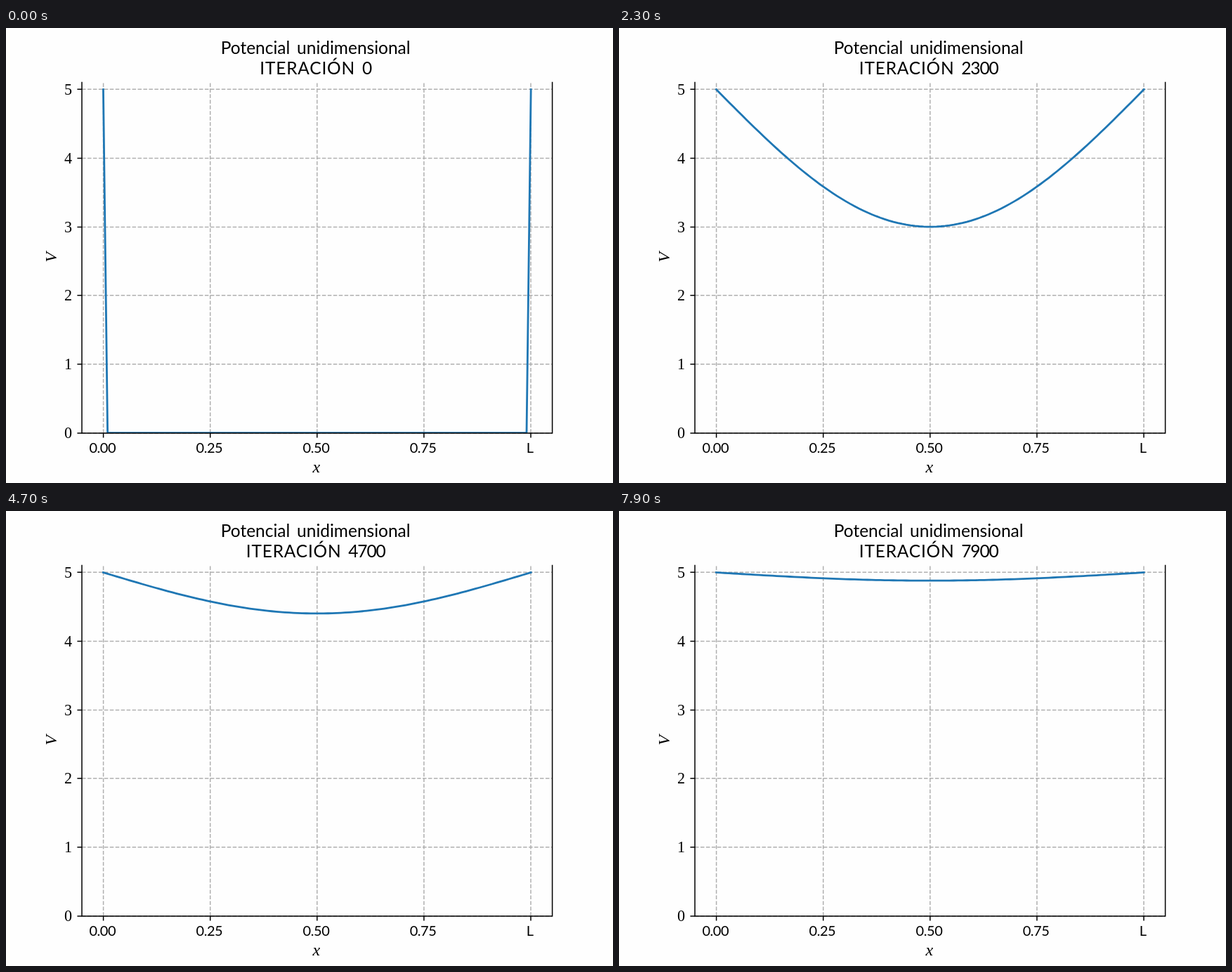
These frames come from a looping animation (864 px wide and 648 px high, 8 s). An HTML page:

```html
<!DOCTYPE html>
<html lang="es">
<head>
<meta charset="utf-8">
<title>Potencial unidimensional</title>
<style>
  html, body { margin: 0; width: 100%; height: 100%; overflow: hidden; background: #fefefe; }
  svg { display: block; width: 864px; height: 648px; }
  text { text-anchor: middle; fill: #000; }
  .title { font: 27.2px Lato, "Open Sans", sans-serif; word-spacing: 4px; }
  .word { letter-spacing: .9px; }
  .count { letter-spacing: -1.3px; }
  .xtick { font: 22.2px Lato, "Open Sans", sans-serif; letter-spacing: -.5px; }
  .ytick { font: 24.5px "Liberation Serif", "Noto Serif", serif; text-anchor: end; }
  .axis { font: italic 26.6px "Liberation Serif", "Noto Serif", serif; }
  .grid { stroke: #b0b0b0; stroke-width: 1.667; stroke-dasharray: 6.167 2.667; fill: none; }
  .frame { stroke: #000; stroke-width: 1.667; fill: none; }
  .curve { stroke: #1f77b4; stroke-width: 3.125; stroke-linecap: square; stroke-linejoin: round; fill: none; }
</style>
</head>
<body>
<svg viewBox="0 0 960 720">
  <clipPath id="area"><rect x="120" y="86" width="744" height="555"/></clipPath>
  <text class="title" x="489.6" y="40.8">Potencial unidimensional</text>
  <text class="title" x="489.6" y="73.7"><tspan class="word">ITERACIÓN</tspan> <tspan class="count" id="count">0</tspan></text>
  <path class="grid" id="grid"/>
  <path class="curve" id="curve" clip-path="url(#area)"/>
  <path class="frame" id="ticks"/>
  <path class="frame" stroke-linecap="square" d="M120 86V641M864 86V641M120 641H864"/>
  <g id="labels"></g>
  <text class="axis" x="491" y="703.3">x</text>
  <text class="axis" transform="translate(79.6 362.8) rotate(-90)">V</text>
</svg>
<script>
  const POINTS = 100, EDGE = 5, STEPS = 80, STEP_MS = 100, SWEEPS = 100;
  const $ = id => document.getElementById(id);
  const px = x => 153.82 + 676.36 * x;
  const py = v => 640.8 - 108.706 * v;

  function drawAxes() {
    let grid = "", ticks = "", labels = "";
    ["0.00", "0.25", "0.50", "0.75", "L"].forEach((name, i) => {
      const x = Math.round(px(i / 4));
      grid += `M${x} 641V86`;
      ticks += `M${x} 641v7.3`;
      labels += `<text class="xtick" x="${x - 1.5}" y="672.2">${name}</text>`;
    });
    for (let v = 0; v <= EDGE; v++) {
      const y = Math.round(py(v));
      grid += `M120 ${y}H864`;
      ticks += `M120 ${y}h-7.3`;
      labels += `<text class="ytick" x="104.4" y="${y + 8}">${v}</text>`;
    }
    $("grid").setAttribute("d", grid);
    $("ticks").setAttribute("d", ticks);
    $("labels").innerHTML = labels;
  }

  // Each interior point becomes the mean of its neighbours.
  const relax = v => v.map((value, i) =>
    i === 0 || i === POINTS - 1 ? value : (v[i - 1] + v[i + 1]) / 2);

  const toPath = v => "M" + Array.from(v, (value, i) =>
    px(i / (POINTS - 1)).toFixed(2) + " " + py(value).toFixed(2)).join("L");

  function solve() {
    const paths = [];
    let v = new Float64Array(POINTS);
    v[0] = v[POINTS - 1] = EDGE;
    for (let s = 0; s < STEPS; s++) {
      paths.push(toPath(v));
      for (let n = 0; n < SWEEPS; n++) v = relax(v);
    }
    return paths;
  }

  drawAxes();
  const paths = solve();
  const start = performance.now();
  let shown = -1;

  function draw() {
    const step = Math.floor((performance.now() - start) / STEP_MS) % STEPS;
    if (step !== shown) {
      shown = step;
      $("curve").setAttribute("d", paths[step]);
      $("count").textContent = step * SWEEPS;
    }
    requestAnimationFrame(draw);
  }
  draw();
</script>
</body>
</html>
```
